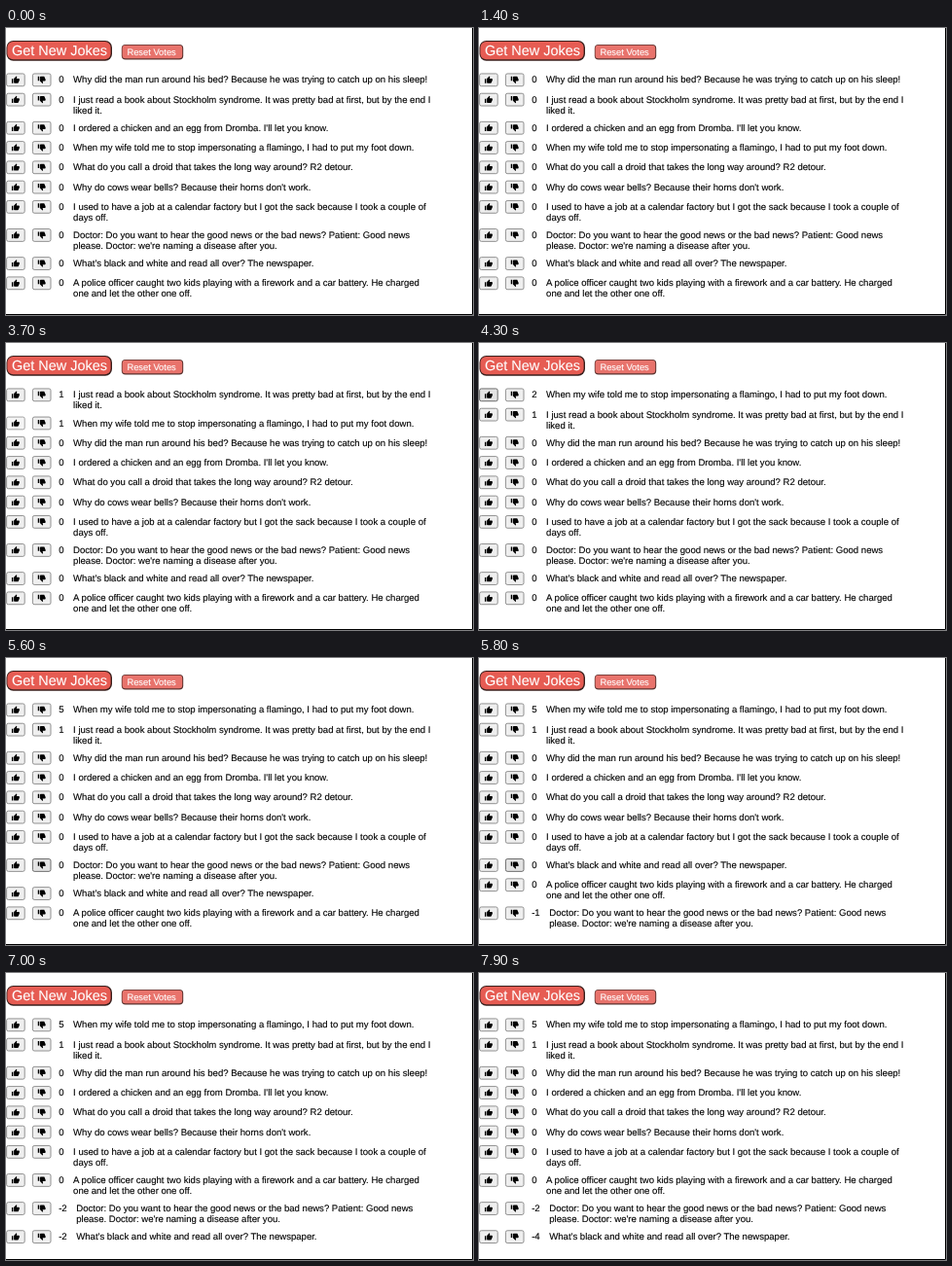
These frames come from a looping animation (480x295 px, 8 s). An HTML page:

```html
<!DOCTYPE html>
<html lang="en">
<head>
<meta charset="utf-8">
<title>Jokes</title>
<style>
  html, body { margin: 0; width: 100%; height: 100%; overflow: hidden; background: #fff; }
  svg { display: block; width: 480px; height: 295px; }
  text { font-family: "Liberation Sans", Arial, sans-serif; text-rendering: geometricPrecision; }
  .label { fill: #fff; stroke: #fff; stroke-width: .12; }
  .joke text { font-size: 9.57px; fill: #000; stroke: #000; stroke-width: .12; }
  .key { stroke-width: .8; fill: #efefef; stroke: #767676; }
  .key.hover { fill: #e3e3e3; stroke: #4a4a4a; }
  .key.down { fill: #f5f5f5; stroke: #8d8d8d; }
</style>
</head>
<body>
<svg id="stage" viewBox="0 0 480 295">
  <defs>
    <path id="thumb" d="M1 21h4V9H1zM23 10c0-1.1-.9-2-2-2h-6.3l1-4.6c.1-.5 0-1-.4-1.4L14.2 1 7.6 7.6C7.2 8 7 8.5 7 9v10c0 1.1.9 2 2 2h9c.8 0 1.5-.5 1.8-1.2l3-7c.2-.3.2-.6.2-.8z"/>
  </defs>
  <rect width="480" height="295" fill="#fff"/>
  <rect x=".5" y="13" width="108.5" height="20.8" rx="7" fill="#3a1f1c"/>
  <rect x="1.4" y="13.9" width="106.200" height="18.400" rx="6" fill="#e65c53"/>
  <text class="label" x="6" y="28.3" font-size="14.45">Get New Jokes</text>
  <rect x="118.800" y="17" width="63.400" height="15.400" rx="4" fill="#5a302d"/>
  <rect x="119.500" y="17.700" width="61.700" height="13.600" rx="3.300" fill="#e8736c"/>
  <text class="label" x="124.400" y="28" font-size="9.350">Reset Votes</text>
  <g id="list"></g>
  <path d="M0 294.500H479.500V0" fill="none" stroke="#000"/>
</svg>
<script>
const LOOP = 8000;
const TOP = 53.25, SINGLE = 20.28, DOUBLE = 29.1, LINE = 10.8;
const NS = "http://www.w3.org/2000/svg";

const jokes = [
  ["Why did the man run around his bed? Because he was trying to catch up on his sleep!"],
  ["I just read a book about Stockholm syndrome. It was pretty bad at first, but by the end I", "liked it."],
  ["I ordered a chicken and an egg from Dromba. I'll let you know."],
  ["When my wife told me to stop impersonating a flamingo, I had to put my foot down."],
  ["What do you call a droid that takes the long way around? R2 detour."],
  ["Why do cows wear bells? Because their horns don't work."],
  ["I used to have a job at a calendar factory but I got the sack because I took a couple of", "days off."],
  ["Doctor: Do you want to hear the good news or the bad news? Patient: Good news", "please. Doctor: we're naming a disease after you."],
  ["What's black and white and read all over? The newspaper."],
  ["A police officer caught two kids playing with a firework and a car battery. He charged", "one and let the other one off."]
];
const BOOK = 1, WIFE = 3, DOCTOR = 7, PAPER = 8;

// time, joke, change of score
const votes = [
  [2000, WIFE, 1], [2900, BOOK, 1], [3800, WIFE, 1],
  [4500, WIFE, 1], [4700, WIFE, 1], [4900, WIFE, 1],
  [5800, DOCTOR, -1], [6200, PAPER, -1],
  [6700, DOCTOR, -1], [6800, PAPER, -1],
  [7300, PAPER, -1], [7600, PAPER, -1]
];

// time, row, button, look
const pointer = [
  [0], [1600, 3, "up", "hover"], [1900, 3, "up", "down"], [2000, 3, "up", "hover"], [2400],
  [2500, 2, "up", "hover"], [2800, 2, "up", "down"], [2900, 2, "up", "hover"], [3200],
  [3600, 1, "up", "hover"], [3700, 1, "up", "down"], [3800, 1, "up", "hover"], [4000],
  [4100, 0, "up", "hover"], [4400, 0, "up", "down"], [4500, 0, "up", "hover"],
  [4600, 0, "up", "down"], [4700, 0, "up", "hover"], [4800, 0, "up", "down"],
  [4900, 0, "up", "hover"], [5100],
  [5300, 0, "down", "hover"], [5400, 7, "down", "hover"], [5700, 7, "down", "down"],
  [5800, 7, "down", "hover"], [6100, 7, "down", "down"], [6200, 7, "down", "hover"], [6300],
  [6600, 8, "down", "down"], [6700, 8, "down", "hover"], [7000],
  [7100, 9, "down", "hover"], [7200, 9, "down", "down"], [7300, 9, "down", "hover"],
  [7500, 9, "down", "down"], [7600, 9, "down", "hover"], [7900]
];

function add(parent, tag, attrs, content) {
  const el = document.createElementNS(NS, tag);
  for (const name in attrs) el.setAttribute(name, attrs[name]);
  if (content !== undefined) el.textContent = content;
  return parent.appendChild(el);
}

function addKey(parent, x, flip) {
  const key = add(parent, "rect", { class: "key", x, y: -6.3, width: 18.6, height: 12.8, rx: 1.8 });
  add(parent, "use", {
    href: "#thumb",
    transform: `translate(${x + 9.3} 0) scale(.36 ${flip * .36}) translate(-12 -11.5)`
  });
  return key;
}

const list = document.getElementById("list");
const rows = jokes.map(lines => {
  const g = add(list, "g", { class: "joke" });
  const up = addKey(g, .6, 1);
  const down = addKey(g, 27.4, -1);
  const score = add(g, "text", { x: 54.2, y: 3.2 });
  const body = add(g, "g", {});
  lines.forEach((line, i) => add(body, "text", { x: 69.1, y: 3.2 + i * LINE }, line));
  return { g, up, down, score, body, height: lines.length > 1 ? DOUBLE : SINGLE };
});

function draw(t) {
  const scores = jokes.map(() => 0);
  for (const [at, joke, change] of votes) if (at <= t) scores[joke] += change;
  const [, hotRow, hotKey, look] = pointer.filter(p => p[0] <= t).pop();

  let y = TOP;
  const order = jokes.map((_, i) => i).sort((a, b) => scores[b] - scores[a] || a - b);
  order.forEach((joke, place) => {
    const row = rows[joke];
    row.g.setAttribute("transform", `translate(0 ${y})`);
    row.score.textContent = scores[joke];
    row.body.setAttribute("transform", `translate(${scores[joke] < 0 ? 3.18 : 0} 0)`);
    for (const key of ["up", "down"]) {
      const hot = place === hotRow && key === hotKey;
      row[key].setAttribute("class", hot ? "key " + look : "key");
    }
    y += row.height;
  });
}

const start = performance.now();
function tick() {
  draw((performance.now() - start) % LOOP);
  requestAnimationFrame(tick);
}
tick();
</script>
</body>
</html>
```
